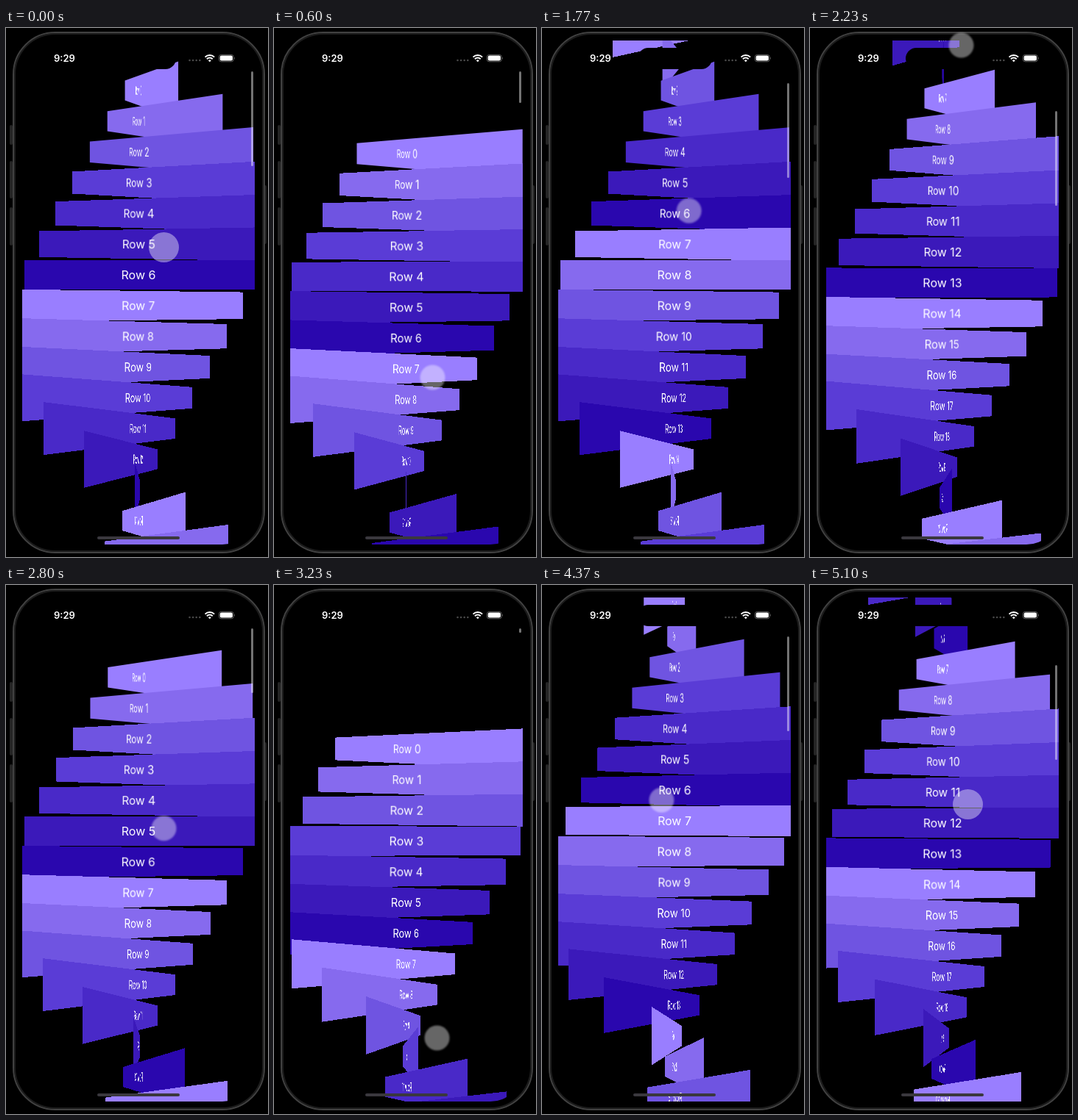
An HTML page for the animation above (5130 ms loop, 356 by 720 pixels).

```html
<!DOCTYPE html>
<html lang="en">
<head>
<meta charset="utf-8">
<title>Rotating rows</title>
<style>
  html, body { margin: 0; width: 100%; height: 100%; overflow: hidden; background: #000; }
  body { position: relative; font-family: Inter, "Liberation Sans", sans-serif; color: #fff; }
  div, svg { position: absolute; box-sizing: border-box; }
  .key { background: #252525; border-radius: 2px; width: 4px; }
  #body { left: 9px; top: 5px; width: 343px; height: 710px; border-radius: 58px; background: #000;
    border: 2px solid #414141; box-shadow: inset 0 0 0 2px #1c1c1c; }
  #screen { left: 22px; top: 17px; width: 316px; height: 685.5px; border-radius: 44px; overflow: hidden; }
  .row { left: 0; top: -20px; width: 316px; height: 40px; font-size: 16px; line-height: 40px; text-align: center; }
  #island { left: 129.5px; top: 26.5px; width: 101px; height: 29.5px; border-radius: 15px; background: #000; }
  #clock { left: 65px; top: 33px; font-size: 13px; line-height: 16px; font-weight: 600; }
  #home { left: 124px; top: 692px; width: 112px; height: 4px; border-radius: 2px; background: #3a383e; }
  #bar { left: 332.5px; width: 3px; border-radius: 2px; background: rgba(255, 255, 255, .45); }
  #touch { left: 0; top: 0; width: 41px; height: 41px; margin: -20.5px; border-radius: 50%;
    background: rgba(255, 255, 255, .4); }
</style>
</head>
<body>
<div class="key" style="left:5px;top:132px;height:27px"></div>
<div class="key" style="left:5px;top:181px;height:51px"></div>
<div class="key" style="left:5px;top:244px;height:52px"></div>
<div class="key" style="left:350px;top:214px;height:80px"></div>
<div id="body"></div>
<div id="screen"></div>
<div id="island"></div>
<div id="clock">9:29</div>
<svg style="left:246px;top:32px" width="68" height="18" fill="none">
  <path d="M3.5 12h15" stroke="#4a4a4a" stroke-width="2.6" stroke-linecap="round" stroke-dasharray="0 4.6"/>
  <g stroke="#fff" stroke-width="2">
    <path d="M24.5 7.6a9 9 0 0 1 12.6 0M26.9 10.2a5.6 5.6 0 0 1 7.8 0"/>
    <path d="M30.8 14.3l-2-2a2.9 2.9 0 0 1 4 0z" fill="#fff" stroke="none"/>
  </g>
  <rect x="43.4" y="4.4" width="19.8" height="9.4" rx="3" stroke="#777" stroke-width=".8"/>
  <rect x="44.7" y="5.6" width="17.2" height="7" rx="2" fill="#fff"/>
  <path d="M64.4 7.4q1.4 1.7 0 3.4z" fill="#777"/>
</svg>
<div id="bar"></div>
<div id="home"></div>
<div id="touch"></div>
<script>
const LOOP = 5130, PITCH = 41.83, COUNT = 26;
const colors = ['#997eff', '#866aee', '#6f54e1', '#5a3cd6', '#4929c8', '#3b19ba', '#2a07ae'];
const $ = id => document.getElementById(id);

// [time, scroll offset]; negative values pull past the top
const scroll = [
  [0, 0], [100, 0], [350, -56], [600, -86], [950, -103], [1330, -96], [1560, -27], [1800, 98],
  [2230, 282], [2330, 286], [2540, 128], [2750, -17], [2950, -95], [3130, -139.5], [3230, -138],
  [3730, -132], [4000, -101], [4200, -52], [4320, 5], [4370, 56], [4470, 128], [4700, 197],
  [4900, 236], [5100, 263], [LOOP, 266]
];
// [time, x, y]
const finger = [
  [0, 214, 298], [130, 214, 298], [400, 215, 410], [600, 215, 475], [1000, 208, 522], [1330, 196, 510],
  [1850, 200, 200], [2230, 205, 23], [2350, 206, 21], [2800, 214, 330], [3180, 221, 617], [3230, 221, 616],
  [3780, 214, 600], [4150, 185, 450], [4370, 162, 293], [4560, 155, 170], [4680, 160, 160],
  [5000, 214, 298], [LOOP, 214, 298]
];
const press = [[0, 1], [60, 1], [180, .83], [4530, .83], [4680, 1], [LOOP, 1]];

// Monotone cubic interpolation of column c
function sample(keys, t, c = 1) {
  const slope = i => (keys[i + 1][c] - keys[i][c]) / (keys[i + 1][0] - keys[i][0]);
  const tangent = i => {
    if (i === 0 || i === keys.length - 1) return 0;
    const a = slope(i - 1), b = slope(i);
    return a * b > 0 ? 2 * a * b / (a + b) : 0;
  };
  let i = 0;
  while (i < keys.length - 2 && keys[i + 1][0] <= t) i++;
  const h = keys[i + 1][0] - keys[i][0], u = (t - keys[i][0]) / h, v = 1 - u;
  return keys[i][c] * (1 + 2 * u) * v * v + keys[i + 1][c] * u * u * (3 - 2 * u)
    + h * u * v * (tangent(i) * v - tangent(i + 1) * u);
}

const rows = Array.from({ length: COUNT }, (_, n) => {
  const row = document.createElement('div');
  row.className = 'row';
  row.textContent = 'Row ' + n;
  row.style.background = colors[n % colors.length];
  $('screen').append(row);
  return row;
});

function draw(now) {
  const t = now % LOOP, offset = sample(scroll, t);
  rows.forEach((row, n) => {
    const y = 85 - offset + n * PITCH;
    const angle = (y - 342.4) * 13 / PITCH;
    row.style.transform = `translateY(${y - 17}px) perspective(316px) rotateY(${angle}deg)`;
  });
  $('bar').style.top = 59 + Math.max(offset, 0) * .19 + 'px';
  $('bar').style.height = Math.max(6, 129 + Math.min(offset, 0)) + 'px';

  const size = sample(press, t);
  $('touch').style.transform = `translate(${sample(finger, t)}px, ${sample(finger, t, 2)}px) scale(${size})`;
  $('touch').style.filter = `blur(${(1 - size) * 7}px)`;
  requestAnimationFrame(draw);
}
requestAnimationFrame(draw);
</script>
</body>
</html>
```
